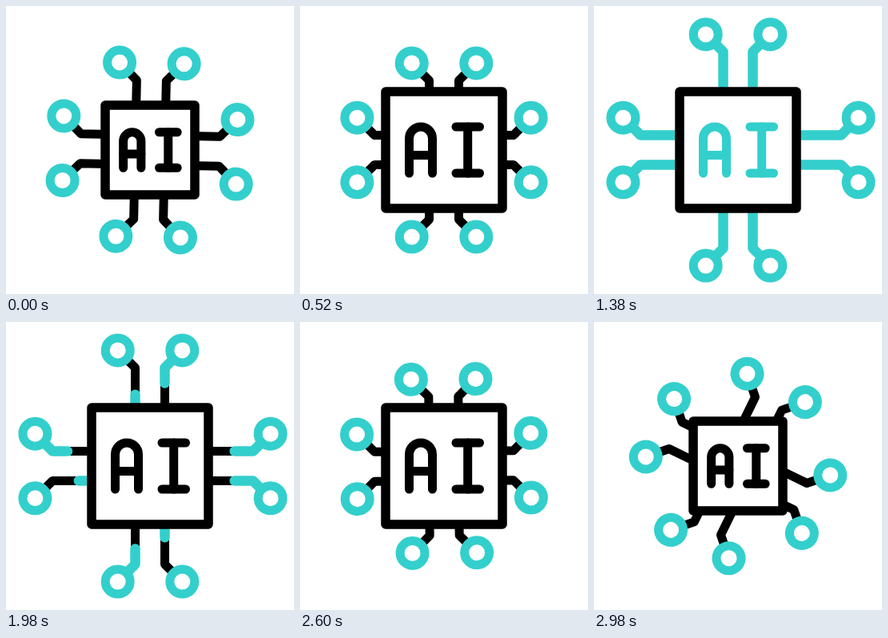
These frames come from a looping animation (360x360 px, 3000 ms). An HTML page with a canvas:

```html
<!DOCTYPE html>
<html lang="en">
<head>
<meta charset="utf-8">
<title>AI chip</title>
<style>
  html, body { margin: 0; width: 100%; height: 100%; overflow: hidden; background: #fff; }
  canvas { display: block; width: 360px; height: 360px; }
</style>
</head>
<body>
<canvas width="360" height="360"></canvas>
<script>
const canvas = document.querySelector('canvas');
const ctx = canvas.getContext('2d');
const TEAL = [51, 207, 204];
const teal = `rgb(${TEAL})`;
const LOOP = 3000;
const REACH = [36, 42, 36, 35]; // extension of top, right, bottom, left pins

const ramp = (t, a, b) => Math.min(1, Math.max(0, (t - a) / (b - a)));
const smooth = (t, a, b) => { const p = ramp(t, a, b); return p * p * (3 - 2 * p); };

function spin(t) {
  if (t < 1500) return 2 * Math.PI * Math.sin(ramp(t, 0, 460) * Math.PI / 2);
  return 2 * Math.PI * Math.cos(ramp(t, 2588, 3000) * Math.PI / 2);
}

function chipScale(t) {
  return 0.767 + 0.29 * smooth(t, 0, 300) - 0.057 * smooth(t, 320, 480)
    + 0.057 * smooth(t, 2600, 2720) - 0.29 * smooth(t, 2720, 2980);
}

function line(points, color, width) {
  ctx.strokeStyle = color;
  ctx.lineWidth = width;
  ctx.beginPath();
  points.forEach(([x, y]) => ctx.lineTo(x, y));
  ctx.stroke();
}

// One pin in local coordinates, pointing up; side is -1 or 1.
function drawPin(t, quarter, side, extend) {
  const x = 40.3 * side, y = -108.6 - REACH[quarter] * extend;
  const rodX = 18.5 * side, elbow = y + 21.8;
  const rod = end => [[x, y], [rodX, elbow], [rodX, end]];
  line(rod(-50), '#000', 11);

  // Inputs carry the signal from ring to chip, outputs from chip to ring.
  const input = side < 0 && quarter !== 1;
  const head = input ? ramp(t, 1040, 1240) : ramp(t, 1180, 1360);
  const tail = input ? ramp(t, 1820, 2022) : ramp(t, 1900, 2115);
  if (head > tail) {
    const length = 21.8 * Math.SQRT2 - 73 - elbow;
    const start = length * (input ? tail : 1 - head);
    ctx.setLineDash([length * (head - tail), 999]);
    ctx.lineDashOffset = -start;
    line(rod(-73), teal, 12.5);
    ctx.setLineDash([]);
  }

  ctx.beginPath();
  ctx.arc(x, y, 15.5, 0, 2 * Math.PI);
  ctx.fillStyle = '#fff';
  ctx.fill();
  ctx.strokeStyle = teal;
  ctx.lineWidth = 11;
  ctx.stroke();
}

function drawChip(t) {
  const k = chipScale(t), half = 73 * k;
  ctx.lineWidth = 11.5;
  ctx.strokeStyle = '#000';
  ctx.fillStyle = '#fff';
  ctx.beginPath();
  ctx.rect(-half, -half, 2 * half, 2 * half);
  ctx.fill();
  ctx.stroke();

  const glow = ramp(t, 1180, 1320) - ramp(t, 1740, 1900);
  const color = `rgb(${TEAL.map(c => Math.round(c * glow))})`;
  const stroke = (...points) => line(points.map(([x, y]) => [x * k, y * k]), color, 11);

  // A
  ctx.strokeStyle = color;
  ctx.lineWidth = 11;
  ctx.beginPath();
  ctx.moveTo(-43.5 * k, 29 * k);
  ctx.arc(-29 * k, -14.5 * k, 14.5 * k, Math.PI, 0);
  ctx.lineTo(-14.5 * k, 29 * k);
  ctx.stroke();
  stroke([-43.5, 6.5], [-14.5, 6.5]);

  // I
  stroke([15, -29], [44.5, -29]);
  stroke([29.7, -29], [29.7, 29]);
  stroke([15, 29], [44.5, 29]);
}

function frame(now) {
  const t = now % LOOP;
  const extend = smooth(t, 555, 1040) - smooth(t, 2160, 2580);
  ctx.setTransform(1, 0, 0, 1, 180, 180);
  ctx.clearRect(-180, -180, 360, 360);
  ctx.lineCap = ctx.lineJoin = 'round';
  ctx.save();
  ctx.rotate(spin(t));
  for (let quarter = 0; quarter < 4; quarter++) {
    drawPin(t, quarter, -1, extend);
    drawPin(t, quarter, 1, extend);
    ctx.rotate(Math.PI / 2);
  }
  ctx.restore();
  drawChip(t);
}

const begin = performance.now();
function tick() {
  frame(performance.now() - begin);
  requestAnimationFrame(tick);
}
tick();
</script>
</body>
</html>
```
